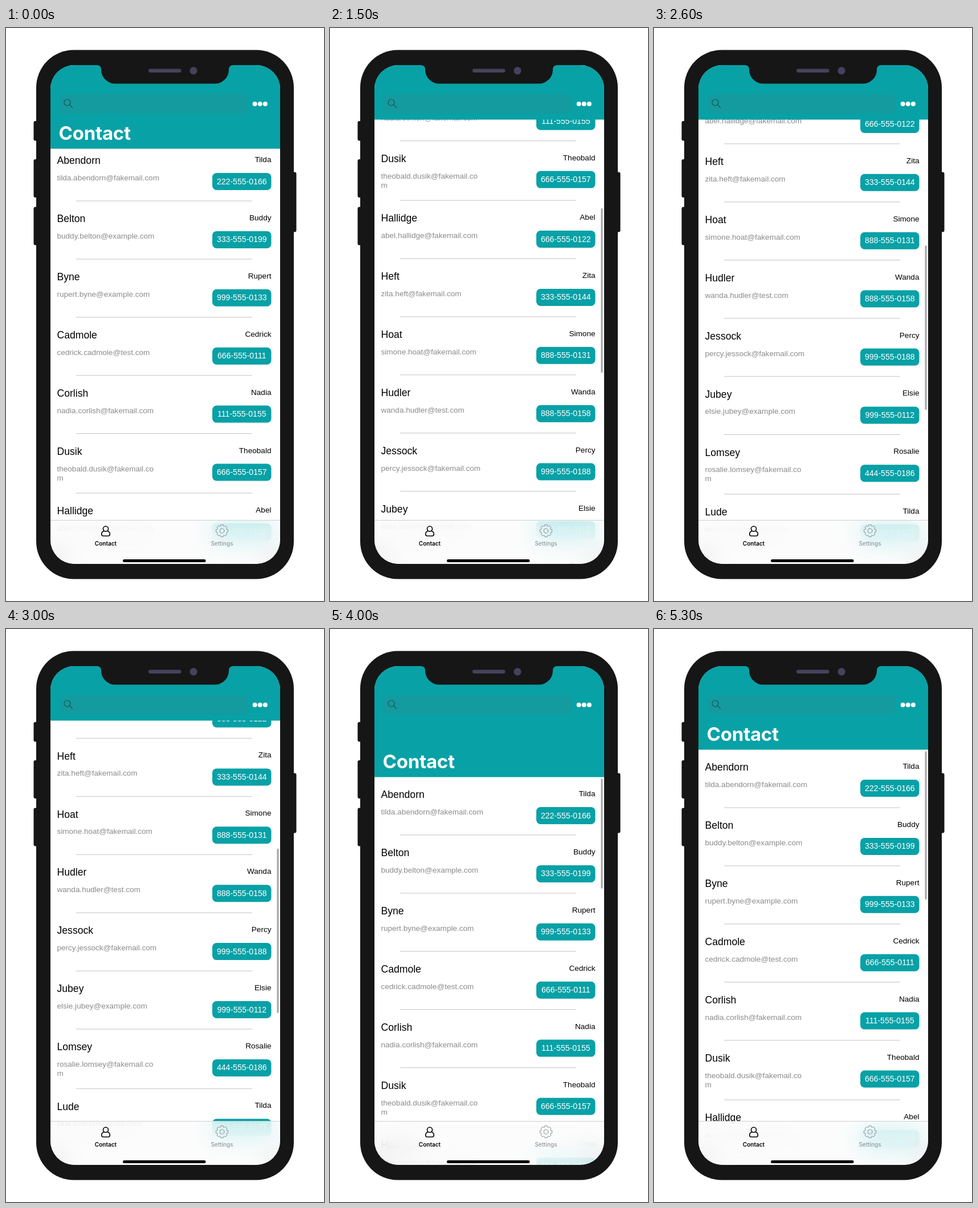
These frames come from a looping animation (558 by 1004 pixels, 6000 ms). An HTML page:

```html
<!DOCTYPE html>
<html lang="en">
<head>
<meta charset="utf-8">
<title>Contact list</title>
<style>
  html, body { margin: 0; width: 100%; height: 100%; overflow: hidden; background: #fff; }
  svg { position: absolute; left: 0; top: 0; display: block; }
  .screen { position: absolute; left: 78px; top: 65px; width: 403px; height: 874px;
    border-radius: 42px; overflow: hidden; background: #fff; }
  .tabs { position: absolute; left: 0; top: 797px; width: 100%; height: 77px; box-sizing: border-box;
    border-top: 1px solid #cfcfcf; background: rgba(251, 251, 251, .77);
    backdrop-filter: saturate(1.8) blur(20px); }
  text { font-family: "Liberation Sans", Arial, sans-serif; }
  .last { font-size: 17.6px; }
  .first { font-size: 13.6px; text-anchor: end; }
  .mail { font-size: 13.55px; fill: #8b8b8b; }
  .phone { font-size: 14.1px; fill: #fff; text-anchor: middle; }
  .teal { fill: #08a1a6; }
  .title { font: 700 33px Inter, sans-serif; letter-spacing: -.25px; fill: #fff; }
  .tab { font: 600 10px Inter, sans-serif; text-anchor: middle; }
  .line { fill: none; stroke-linecap: round; stroke-linejoin: round; }
</style>
</head>
<body>
<svg width="558" height="1004" fill="#161616">
  <rect x="53" y="38.5" width="452" height="927" rx="66"/>
  <rect x="48.5" y="163" width="10" height="34.5" rx="3"/>
  <rect x="48.5" y="230" width="10" height="67" rx="3"/>
  <rect x="48.5" y="313.5" width="10" height="67" rx="3"/>
  <rect x="500" y="252.5" width="9.5" height="105" rx="3"/>
</svg>

<div class="screen">
  <svg width="403" height="874" viewBox="78 65 403 874">
    <g id="list"></g>
    <rect id="header" class="teal" x="78" y="65" width="403"/>
    <text id="title" class="title" x="92.5">Contact</text>
    <rect class="teal" x="78" y="65" width="403" height="95"/>
    <rect x="94" y="116" width="330" height="34" rx="9" fill="#139b9f"/>
    <g class="line" stroke="#1d4e50" stroke-width="1.2">
      <circle cx="107.5" cy="130.5" r="5.5"/>
      <path d="M111.5 134.5L116.5 139.5"/>
    </g>
    <g fill="#fff">
      <circle cx="436.7" cy="133" r="4"/>
      <circle cx="445.8" cy="133" r="4"/>
      <circle cx="454.9" cy="133" r="4"/>
    </g>
    <rect id="thumb" x="475.5" width="3" rx="1.5" fill="#a3a3a3"/>
  </svg>
  <div class="tabs"></div>
  <svg width="403" height="874" viewBox="78 65 403 874">
    <path fill="#161616" d="M159 64V65Q167 65 167 73A24.5 24.5 0 0 0 191.5 97.5H366.5A24.5 24.5 0 0 0 391 73Q391 65 399 65V64Z"/>
    <g fill="#46425d">
      <rect x="250" y="71.5" width="57.5" height="6.5" rx="3.25"/>
      <circle cx="329" cy="74.8" r="6.6"/>
    </g>
    <g class="line" stroke="#000" stroke-width="1.6">
      <circle cx="175" cy="877.5" r="4.5"/>
      <path d="M171.5 881.5C168.5 882.5 167.7 885 167.7 887Q167.7 890 170.7 890H179.3Q182.3 890 182.3 887C182.3 885 181.5 882.5 178.5 881.5"/>
    </g>
    <g class="line" stroke="#8b9094">
      <path id="gear"/>
      <circle cx="379" cy="881" r="4"/>
    </g>
    <text class="tab" x="175" y="906.5">Contact</text>
    <text class="tab" x="379" y="906.5" fill="#93979a" style="font-weight:500">Settings</text>
    <rect x="205" y="931" width="145.5" height="5" rx="2.5"/>
  </svg>
</div>

<script>
const $ = id => document.getElementById(id);

// "|" marks where an address wraps.
const contacts = [
  ['Abendorn', 'Tilda', 'fakemail.com', '222-555-0166'],
  ['Belton', 'Buddy', 'example.com', '333-555-0199'],
  ['Byne', 'Rupert', 'example.com', '999-555-0133'],
  ['Cadmole', 'Cedrick', 'test.com', '666-555-0111'],
  ['Corlish', 'Nadia', 'fakemail.com', '111-555-0155'],
  ['Dusik', 'Theobald', 'fakemail.co|m', '666-555-0157'],
  ['Hallidge', 'Abel', 'fakemail.com', '666-555-0122'],
  ['Heft', 'Zita', 'fakemail.com', '333-555-0144'],
  ['Hoat', 'Simone', 'fakemail.com', '888-555-0131'],
  ['Hudler', 'Wanda', 'test.com', '888-555-0158'],
  ['Jessock', 'Percy', 'fakemail.com', '999-555-0188'],
  ['Jubey', 'Elsie', 'example.com', '999-555-0112'],
  ['Lomsey', 'Rosalie', 'fakemail.co|m', '444-555-0186'],
  ['Lude', 'Tilda', 'fakemail.com', '333-555-0177'],
];

let rowY = 0;
$('list').innerHTML = contacts.map(([last, first, domain, phone]) => {
  const mail = `${first}.${last}@`.toLowerCase() + domain;
  const height = domain.includes('|') ? 104.4 : 101.9;
  const lines = mail.split('|').map((part, i) =>
    `<text class="mail" x="89.5" y="${35 + i * 16}">${part}</text>`).join('');
  const row = `<g transform="translate(0 ${rowY})">
    <text class="last" x="89.5" y="6.2">${last}</text>
    <text class="first" x="465.5" y="3">${first}</text>
    ${lines}
    <rect class="teal" x="362" y="22" width="103.5" height="30" rx="7.5"/>
    <text class="phone" x="413.8" y="41.5">${phone}</text>
    <rect x="123" y="${height - 31.5}" width="309" height="1.2" fill="#cdcdcd"/>
  </g>`;
  rowY += height;
  return row;
}).join('');

// Eight-toothed gear: each tooth is an outer and an inner flat.
const gear = [];
for (let i = 0; i < 8; i++) {
  for (const [offset, r] of [[-.2, 10.8], [.2, 10.8], [.3, 8.6], [.49, 8.6]]) {
    const a = i * Math.PI / 4 + offset;
    gear.push(`${(379 + r * Math.cos(a)).toFixed(2)} ${(881 + r * Math.sin(a)).toFixed(2)}`);
  }
}
$('gear').setAttribute('d', `M${gear.join('L')}Z`);

const LOOP = 6000, STEP = 100;
const REST_TOP = 242, COAST_END = -502, BOUNCE_AT = 4000;
// Time and y of the first row: drag, coasting fling, flick back to the top.
const keys = [[0, 232], [700, 232], [800, 224], [900, 190], [1000, 108], [1100, 2],
  [1900, -405], [2600, -482], [3500, -499],
  [3600, -470], [3700, -330], [3800, -90], [3900, 150], [4000, 290]];

function scrollAt(t) {
  if (t >= BOUNCE_AT) {
    const u = (t - BOUNCE_AT) / 100;
    return REST_TOP + (u > 6 ? 0 : 48 * (1 + u) * Math.exp(-u));
  }
  const i = keys.findIndex(([time]) => time > t);
  const [t0, y0] = keys[i - 1], [t1, y1] = keys[i];
  const a = y0 - COAST_END, b = y1 - COAST_END;
  return COAST_END + a * (b / a) ** ((t - t0) / (t1 - t0));
}

function render(now) {
  const t = Math.floor(now % LOOP / STEP) * STEP;
  const y = scrollAt(t);
  const bottom = Math.max(160, y - (t < 1100 ? 21 : 31));
  const length = bottom > 211 ? 260 - 1.4 * (bottom - 211) : 288 - 28 * (bottom - 160) / 51;

  $('list').setAttribute('transform', `translate(0 ${y.toFixed(2)})`);
  $('header').setAttribute('height', bottom + .5 - 65);
  $('title').setAttribute('y', bottom - 15);
  $('thumb').setAttribute('y', bottom + 3 + .324 * Math.max(0, 191 - y));
  $('thumb').setAttribute('height', length);
  $('thumb').setAttribute('visibility', t < 800 ? 'hidden' : 'visible');
}

function tick() {
  render(performance.now());
  requestAnimationFrame(tick);
}
tick();
</script>
</body>
</html>
```
